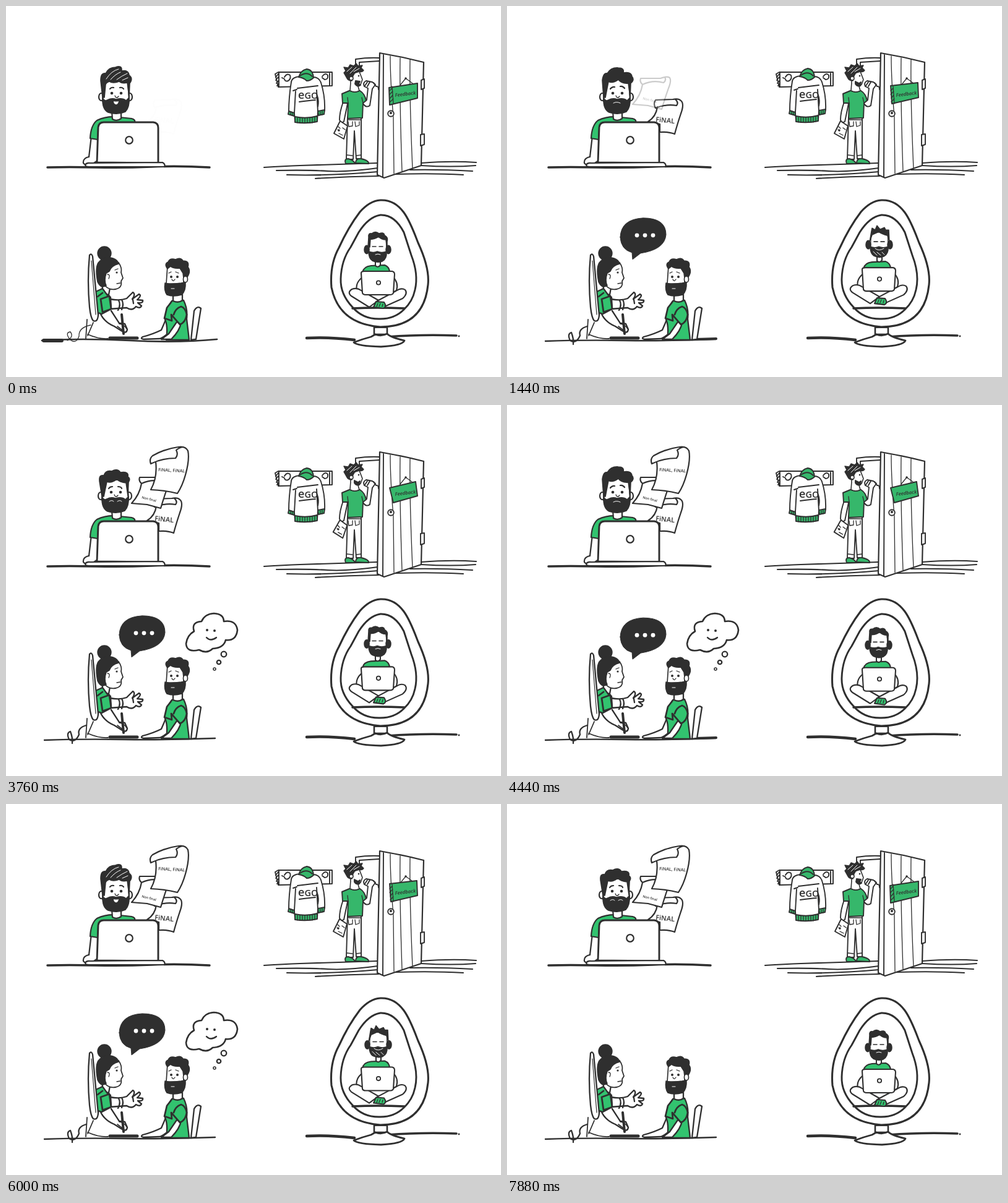
Animation of 800 by 600 pixels, one loop 7.92 s. Source, as an HTML page:

```html
<!DOCTYPE html>
<html lang="en">
<head>
<meta charset="utf-8">
<title>Four sketches</title>
<style>
html, body { margin: 0; width: 100%; height: 100%; overflow: hidden; background: #fff; }
svg { display: block; width: 100vw; height: 100vh; }
path, circle, ellipse { stroke: #2f2f2f; fill: none; stroke-linecap: round; stroke-linejoin: round; }
.w { fill: #fff; }
.g { fill: #32c36f; }
#door .g { fill: #36b76b; }
.k { fill: #2f2f2f; }
.dot { fill: #2f2f2f; stroke: none; }
.light { stroke: #fff; stroke-width: 1; }
.pale { fill: #fff; stroke: none; }
.thin { stroke-width: 1.3; }
.mid { stroke-width: 2.1; }
.bold { stroke-width: 3.5; }
text { font-family: "Open Sans", "Noto Sans", sans-serif; font-weight: 600; fill: #2f2f2f; }
</style>
</head>
<body>
<svg viewBox="0 0 800 600">

<g id="desk" stroke-width="2.2">
  <g id="sheet1">
    <path class="w" d="M243 163Q241 179 228 187L247 191L247 204Q261 203 271 207Q275 192 281 174Q287 158 281 153Q277 149 268 151L240 152Q236 158 240 165Q258 158 274 161Q278 156 272 151"/>
    <text x="240" y="187" font-size="11" transform="rotate(6 240 187)">FiNAL</text>
  </g>
  <g id="sheet2">
    <path class="w" d="M219 127Q216 145 203 159L228 161L250 167Q255 150 261 133Q266 121 263 116Q258 113 248 117L216 117Q214 123 219 127Q236 119 253 124Q258 120 255 115"/>
    <text x="219" y="151" font-size="5.4" transform="rotate(14 219 151)">Non final</text>
  </g>
  <g id="sheet3">
    <path class="w" d="M242 92Q245 117 234 137Q258 138 277 143Q285 131 290 113Q297 88 294 74Q290 66 278 68Q256 71 237 82Q231 87 234 95Q252 86 274 86Q279 80 275 73Q281 68 287 68"/>
    <text x="246" y="107" font-size="7" transform="rotate(3 246 107)">FiNAL, FiNAL</text>
  </g>
  <path d="M67 261Q100 260 145 261T235 260T329 261" class="bold"/>
  <path class="w" d="M138 210L134 244Q124 246 125 254Q128 259 139 256L148 250V210Z"/>
  <path class="g" d="M136 214Q137 193 147 185Q164 177 184 180L203 182Q210 184 208 189L158 190Q149 190 149 198L148 216Z"/>
  <path class="w" d="M171 171L172 183Q179 187 186 182L186 170"/>
  <g id="deskHead">
    <ellipse class="w" cx="154" cy="147" rx="4" ry="6"/>
    <ellipse class="w" cx="200" cy="147" rx="4" ry="6"/>
    <path class="w" stroke="none" d="M158 118L197 118L199 154L156 154Z"/>
    <g data-p="A">
      <path class="k" d="M156 148L153 121Q153 107 161 109Q166 99 177 99Q188 95 187 105Q198 103 199 112Q206 117 200 125L199 147L196 124Q187 126 183 122Q173 126 167 122Q162 124 161 127L159 148Z" stroke-width="1.6"/>
      <path class="light" d="M162 118Q170 105 182 102M169 119Q177 110 185 107M179 119Q187 113 196 109M188 120L197 116"/>
      <path d="M168 134Q170 131 174 132M184 132Q188 131 190 134"/>
    </g>
    <g data-p="C">
      <path class="k" d="M156 148L154 120Q156 107 162 109Q168 99 180 100Q190 100 188 108Q201 106 202 114Q207 119 200 125L199 147L196 125Q185 126 180 119Q170 126 164 122L159 148Z" stroke-width="1.6"/>
      <path d="M167 134Q170 130 174 131M183 130Q187 129 190 133"/>
    </g>
    <g data-p="B">
      <path class="k" d="M156 148L152 123Q151 112 159 114Q162 105 172 107Q181 102 186 109Q200 107 198 116Q203 119 199 125L198 147L195 126Q185 125 180 120Q171 127 164 124L159 148Z" stroke-width="1.6"/>
      <path d="M167 135Q169 132 173 132M182 132Q187 132 188 135"/>
    </g>
    <circle class="dot" cx="171" cy="141" r="2.3"/><circle class="dot" cx="186" cy="141" r="2.3"/>
    <path class="thin" d="M176 145Q178 151 182 146"/>
    <path class="k" d="M156 148Q159 155 164 152Q171 148 178 151Q188 148 194 153L199 148Q200 164 193 171Q180 177 165 172Q155 167 156 148Z" stroke-width="1.5"/>
    <path data-p="A" class="pale" d="M174 154Q178 155 182 154Q181 160 177 159Q174 158 174 154Z"/>
    <path data-p="C" class="light" d="M172 157Q177 154 183 157"/>
    <path data-p="B" class="light" d="M168 156Q172 153 175 156M181 156Q185 153 188 156"/>
  </g>
  <path class="w" d="M147 253L149 196Q150 188 158 188L238 188Q246 189 246 197L246 254Z" stroke-width="2.9"/>
  <path class="w" d="M128 257Q130 253 136 254L253 253Q258 256 256 260L134 260Q128 260 128 257Z"/>
  <circle cx="199" cy="217" r="5.8" stroke-width="2.2"/>
</g>

<g id="door" stroke-width="1.9">
  <path d="M417 261Q450 259 475 258T600 254M437 266Q490 265 520 267T601 262M454 273Q520 275 601 268M500 279Q550 276 602 275" class="mid"/>
  <path d="M671 254Q720 250 760 253M671 258Q720 261 759 258M653 265Q700 264 754 267M630 272Q690 270 739 273" class="mid"/>
  <path d="M565 97L565 86Q585 83 604 84M571 97L571 91L603 89"/>
  <path class="w" d="M435 110L440 107L527 107L527 129L440 131Z"/>
  <path d="M441 108V131M436 115L440 110M436 120L440 115M437 125L441 120M438 129L441 125M523 109V129"/>
  <path d="M450 115Q454 108 459 112Q461 118 456 121Q451 123 450 118L446 116M511 114Q516 107 520 112Q521 119 515 119L511 116"/>
  <g id="coat">
    <path class="w" d="M475 114Q462 115 461 123Q457 148 457 171L466 174L467 185H503L504 171L515 169Q516 146 509 124Q506 115 496 115Z"/>
    <path d="M466 173L468 138M504 171L502 136M464 137L470 135M503 145Q506 153 504 163"/>
    <path class="g" d="M457 170L466 173L466 178L456 175ZM504 170L515 168L514 175L505 177ZM467 179Q485 183 503 178L503 187Q485 191 467 188Z"/>
    <path class="thin" d="M471 181V189M475 181V189M479 181V189M483 181V189M487 181V189M491 181V189M495 180V189M499 180V188M460 172V176M463 173V177M508 171V176M511 170V176"/>
    <path class="g" d="M473 115Q476 104 486 102Q496 103 497 116Q492 121 486 121Q481 116 473 115Z"/>
    <path d="M475 113Q486 105 495 114M471 133Q488 131 504 129M474 155Q489 153 500 152"/>
    <text x="472" y="150" font-size="14.5"><tspan font-size="18">e</tspan>GO</text>
  </g>
  <path class="w" d="M545 155Q539 172 539 184Q541 190 546 187L552 158Z"/>
  <path class="w" d="M552 180L550 248H561L563 202L566 247H574L574 180Z"/>
  <path d="M552 184H574M553 187L554 195L560 194L560 187M564 187L565 195L571 193L571 187M551 241L560 242M566 242L574 241" class="thin"/>
  <path class="w" d="M576 156Q581 166 588 161Q590 148 592 134L597 127L592 123L582 121Q576 124 579 130L585 133L583 152Z"/>
  <path d="M580 129L584 123M584 130L588 123M594 124L598 130Q602 129 602 135"/>
  <path class="g" d="M543 142L555 137Q564 141 572 137Q580 142 582 153L577 157L576 181L552 182L553 157L544 157Z"/>
  <path d="M553 157L552 148M577 157L575 148" class="thin"/>
  <path class="w" d="M557 124L556 137Q564 141 571 137L569 130L573 127L576 119L571 106L555 111Z" stroke-width="1.6"/>
  <path class="k" d="M551 117L546 108L549 105L546 99L553 100L556 95L562 97L566 93L569 97L576 96L574 100L578 104Q576 108 569 106L564 108L561 113L559 121Q553 121 551 117Z" stroke-width="1.4"/>
  <path class="light" d="M551 106L559 99M556 109L566 99M562 106L571 101" stroke-width=".7"/>
  <circle class="w" cx="558" cy="117" r="3" stroke-width="1.5"/>
  <circle class="dot" cx="570" cy="113" r="1.3"/>
  <path data-p="A" class="k" d="M565 121L572 122L570 126L573 128Q568 132 564 126Z"/>
  <path data-p="BC" class="k" d="M563 122L569 125L572 123L571 129Q566 131 563 126Z"/>
  <g id="note">
    <path class="w" d="M540 186L552 194L546 215L530 206Z"/>
    <path class="thin" d="M537 195L540 198M544 197L548 200M538 206L544 209M536 200L538 202"/>
    <circle class="dot" cx="538" cy="201" r="1.7"/>
  </g>
  <path class="g" d="M549 255Q546 247 553 247Q562 249 564 255ZM565 254Q565 246 574 247Q587 250 586 255Z"/>
  <path class="w" d="M604 76L600 273L611 278L671 258L675 91Q640 82 604 76Z" stroke-width="2.2"/>
  <path d="M610 79L609 277"/>
  <path class="thin" d="M621 81Q621 120 626 180L627 271M637 84Q636 150 640 267M653 87Q652 150 657 263"/>
  <path class="w" d="M671 120L676 118V133L671 135ZM670 208L676 207V224L670 226Z"/>
  <circle class="w" cx="622" cy="174" r="4.8"/><circle class="dot" cx="622" cy="173" r="2"/>
  <g id="sign">
    <path d="M637 128L646 117L657 125" class="thin"/><circle class="dot" cx="646" cy="117" r="1.7"/>
    <path data-p="A" class="g" d="M619 132L665 125L665 149L620 160Z"/>
    <path data-p="C" class="g" d="M620 129L664 124L665 148L622 158Z"/>
    <path data-p="B" class="g" d="M620 134L662 124L665 147L626 158Z"/>
    <path data-p="AC" d="M624 130L626 158M620 137L624 133M620 143L625 138M621 149L625 144M621 155L626 150" class="thin"/>
    <text x="629" y="147" font-size="7.8" font-style="italic" transform="rotate(-7 629 147)">Feedback</text>
  </g>
</g>

<g id="pair" stroke-width="2.3">
  <path data-p="A" d="M58 541Q120 537 200 541T341 539" stroke-width="2.7"/>
  <path data-p="A" d="M61 541L90 541" stroke-width="6"/>
  <path data-p="BC" d="M62 542Q120 540 190 541T338 539" stroke-width="2.3"/>
  <path data-p="C" d="M305 539L338 538" stroke-width="4"/>
  <path data-p="D" d="M62 542Q120 540 190 541T337 540" stroke-width="3.4"/>
  <path data-p="A" class="thin" d="M137 516Q117 520 118 534Q113 548 103 539Q95 528 104 527Q110 535 99 541"/>
  <path data-p="BC" d="M130 518Q115 522 118 533Q112 547 102 541Q97 530 104 528Q108 538 107 547"/>
  <path data-p="D" class="thin" d="M135 519Q113 521 116 534Q120 548 106 544Q100 534 105 531Q112 532 108 541"/>
  <path class="w" d="M152 496Q158 511 175 518L186 525Q195 531 196 523L192 514L183 513L170 493"/>
  <path d="M131 507L129 538M141 512L132 533M132 531Q150 539 165 538M150 497L146 509" stroke-width="1.8"/>
  <path class="w" d="M168 474Q184 477 195 473L205 463Q210 466 204 474L215 466Q220 468 212 475L221 476Q222 481 213 480L219 485Q217 490 210 486Q204 494 195 488L168 490Z"/>
  <path d="M182 476Q186 483 181 492M187 475Q191 482 187 491M205 475L206 481"/>
  <path class="w" d="M156 453L155 464L166 467L168 456"/>
  <path class="w" d="M158 425L182 415Q188 424 186 431L189 440L186 445Q188 456 177 458Q166 460 159 451Z" stroke-width="1.8"/>
  <path class="g" d="M145 462L156 457L164 468L169 471L170 490L155 498L146 495Z"/>
  <path d="M148 470L156 464M153 474L167 469L170 490L156 495Z" stroke-width="2.8"/>
  <circle class="k" cx="159" cy="400" r="10.5"/>
  <path class="k" d="M148 446Q143 420 151 413Q160 404 173 408Q181 411 182 417Q170 420 167 429L162 432Q158 444 162 452Q153 458 148 446Z" stroke-width="1.6"/>
  <path class="thin" d="M176 427L181 425M164 434Q169 434 166 441M179 449L185 448"/>
  <circle class="dot" cx="179" cy="431" r="1.6"/>
  <path class="w" d="M135 403Q138 399 140 405L149 500Q148 512 141 509Q137 505 135 487Q131 444 135 403Z"/>
  <path d="M138 412L145 499" stroke-width="1.2"/>
  <path d="M187 499L190 530" stroke-width="4"/>
  <path d="M183 514Q191 515 195 522M180 518L189 525" stroke-width="1.6"/>
  <path d="M168 537L212 537" stroke-width="5"/>
  <path class="w" d="M299 540L304 493Q309 484 315 489L307 539Z"/>
  <g id="listener">
    <path class="w" d="M260 503L251 524Q237 531 221 535Q216 538 223 539L249 538Q264 531 275 514Z"/>
    <path class="g" d="M268 477L287 476Q294 490 292 506L296 540L259 540Q262 518 257 507Q261 486 268 477Z"/>
    <path class="w" d="M276 511L263 530L251 539H267Q281 525 283 512Z"/>
    <path class="g" d="M267 479L260 488L256 505L268 509L267 499L281 515Q290 512 292 499Q290 488 283 486Q274 489 271 499" stroke-width="2.7"/>
    <path class="w" d="M270 465L270 477Q279 481 285 476L285 465"/>
    <path class="w" d="M261 420L287 420L287 449L259 449Z" stroke-width="1.7"/>
    <path class="k" d="M261 425Q255 417 262 414Q265 407 274 410Q282 406 286 412Q297 412 294 422Q300 430 291 441L288 448L286 432L281 424Q270 425 266 421Z" stroke-width="1.6"/>
    <ellipse class="w" cx="290" cy="442" rx="3.5" ry="5" stroke-width="1.7"/>
    <path class="k" d="M257 448L265 450L274 449L283 448L290 447Q291 460 284 467Q270 471 260 467Q255 460 257 448Z" stroke-width="1.5"/>
    <circle class="dot" cx="267" cy="438" r="2"/><circle class="dot" cx="277" cy="438" r="2"/>
    <path class="thin" d="M263 432L267 430M274 430L279 432M268 442Q270 447 273 442"/>
    <path class="light" d="M267 457L272 457" stroke-width="2"/>
  </g>
  <g id="speech">
    <path class="k" d="M183 374Q184 345 220 343Q257 343 257 370Q255 394 216 400L203 410L202 399Q184 394 183 374Z" stroke-width="1"/>
    <circle class="pale" cx="210" cy="371" r="3.4"/><circle class="pale" cx="223" cy="371" r="3.4"/><circle class="pale" cx="236" cy="371" r="3.4"/>
  </g>
  <g id="thought">
    <path class="w" d="M304 366Q299 351 316 350Q321 338 336 337Q352 338 352 350Q372 347 374 364Q372 382 355 380Q352 393 334 394Q325 403 312 396Q292 401 291 386Q293 372 304 366Z" stroke-width="2.6"/>
    <circle class="dot" cx="325" cy="364" r="2"/><circle class="dot" cx="337" cy="365" r="2"/>
    <path d="M324 376Q331 383 340 376"/>
    <circle cx="352" cy="403" r="4.3"/><circle cx="344" cy="416" r="3.2"/><circle cx="337" cy="427" r="2" stroke-width="1.6"/>
  </g>
</g>

<g id="egg" stroke-width="2.1">
  <path d="M486 537Q520 535 563 540" stroke-width="4.4"/>
  <path d="M617 535Q670 531 728 533" class="bold"/>
  <circle class="dot" cx="732" cy="534" r="1.4"/>
  <path class="w" d="M595 517L595 531H616L616 517Z" stroke-width="2.6"/>
  <path d="M596 519H615" stroke-width="4"/>
  <path class="w" d="M562 544Q575 539 590 535L597 531Q606 535 616 530Q621 536 644 541Q641 549 606 551Q568 550 562 544Z" stroke-width="2.8"/>
  <path class="w" d="M605 314C641 312 654 352 666 383Q685 424 682 451Q675 519 605 519Q538 514 526 455Q523 418 538 391Q553 358 572 333Q588 315 605 314Z" stroke-width="3.1"/>
  <path class="w" d="M605 338Q628 337 643 366L655 403Q667 434 661 459Q657 478 643 491Q628 506 605 506Q577 507 560 487Q540 466 541 441Q542 411 557 390L570 366Q586 341 605 338Z" stroke-width="2.9"/>
  <path d="M560 489Q600 487 644 489" class="bold"/>
  <g id="sitter">
    <path class="w" d="M577 438Q564 447 567 461L581 467M625 438Q635 447 631 460L618 468"/>
    <path class="g" d="M576 431Q578 421 590 420L612 419Q620 422 620 431Z"/>
    <path class="w" d="M587 487L558 469Q551 463 559 458Q567 455 574 460L602 476ZM612 486L641 473Q650 465 645 459Q639 455 630 461L600 477Z"/>
    <path class="g" d="M598 478L611 479Q616 486 610 489L594 487Z"/>
    <path class="thin" d="M601 481L599 486M605 481L603 486M609 482L608 486"/>
    <path class="w" d="M574 432Q574 429 579 429L624 429Q628 430 628 434L626 464Q625 467 620 467L581 467Q577 467 576 464Z"/>
    <circle cx="602" cy="447.5" r="3.2" stroke-width="1.8"/>
    <g id="sitterHead">
      <path class="w" d="M597 412L597 420Q601 424 605 419L605 412"/>
      <path class="w" d="M588 374L614 374L615 400L587 400Z" stroke-width="1"/>
      <path data-p="AB" class="k" d="M585 390L586 374Q585 367 591 368Q597 363 603 368Q611 365 612 371Q618 374 616 381L616 392L614 378Q607 378 602 373Q595 378 589 377L588 390Z" stroke-width="1.5"/>
      <path data-p="C" class="k" d="M585 390L588 372L589 367L594 370L597 363L602 369L609 366L611 370L616 370L617 390L614 379Q605 377 600 373L589 378Z" stroke-width="1.5"/>
      <ellipse class="k" cx="583" cy="394" rx="3.7" ry="6.5"/><ellipse class="k" cx="618" cy="394" rx="3.7" ry="6.5"/>
      <path d="M592 389H598M603 389H609" stroke-width="1.6"/>
      <path class="k" d="M586 397Q594 400 600 397Q607 400 615 397Q616 409 608 413Q600 416 592 412Q586 408 586 397Z" stroke-width="1.5"/>
      <path data-p="AB" class="light" d="M597 402Q601 400 605 402"/>
      <path data-p="C" class="light" d="M594 400Q600 405 608 400M591 405L597 411M597 406L603 411M605 406L609 410"/>
    </g>
  </g>
</g>
</svg>
<script>
const LOOP = 7920, STEP = 40;
const $ = id => document.getElementById(id);
const clamp = x => Math.max(0, Math.min(1, x));
const ramp = (t, start, length) => clamp((t - start) / length);
const move = (id, x, y, turn = 0, cx = 0, cy = 0) =>
  $(id).setAttribute('transform', `translate(${x} ${y}) rotate(${turn} ${cx} ${cy})`);
const fade = (id, value) => $(id).setAttribute('opacity', value);

const variants = {};
for (const id of ['desk', 'door', 'pair', 'egg']) variants[id] = [...$(id).querySelectorAll('[data-p]')];

function setPose(id, pose) {
  for (const part of variants[id]) part.style.display = part.dataset.p.includes(pose) ? '' : 'none';
}

function draw(t) {
  const frame = Math.floor(t / STEP), phase = frame % 24;
  const wave = shift => Math.cos((frame - shift) / 66 * 2 * Math.PI);
  const desk = 'ACB'[Math.floor(t / 330) % 3];
  const door = phase < 6 || phase > 22 ? 'A' : phase < 14 ? 'C' : 'B';
  const pair = phase < 5 ? 'A' : phase < 7 ? 'B' : phase < 11 ? 'D' : phase < 16 ? 'C' : 'B';

  setPose('desk', desk);
  setPose('door', door);
  setPose('pair', pair);
  setPose('egg', door);

  move('deskHead', desk === 'B' ? -1 : 0, 0);
  ['sheet1', 'sheet2', 'sheet3'].forEach((id, i) => fade(id, ramp(t, i * 1320, 500)));

  move('coat', 0, door === 'C' ? -1 : 0);
  move('note', door === 'A' ? 0 : -1, 0, door === 'B' ? 3 : 0, 541, 200);

  move('listener', pair === 'D' ? 2 : 0, 0);
  const away = 1 - ramp(t, 6600, 400);
  fade('speech', ramp(t, 660, 400) * away);
  fade('thought', ramp(t, 1980, 400) * away);
  move('speech', 0, -1.5 - 2.7 * wave(14));

  const bob = wave(0);
  move('sitter', 0, 3 * bob - 3);
  move('sitterHead', door === 'C' ? 1 : 0, bob - 1);
}

const start = performance.now();
function tick() {
  draw((performance.now() - start) % LOOP);
  requestAnimationFrame(tick);
}
tick();
</script>
</body>
</html>
```
